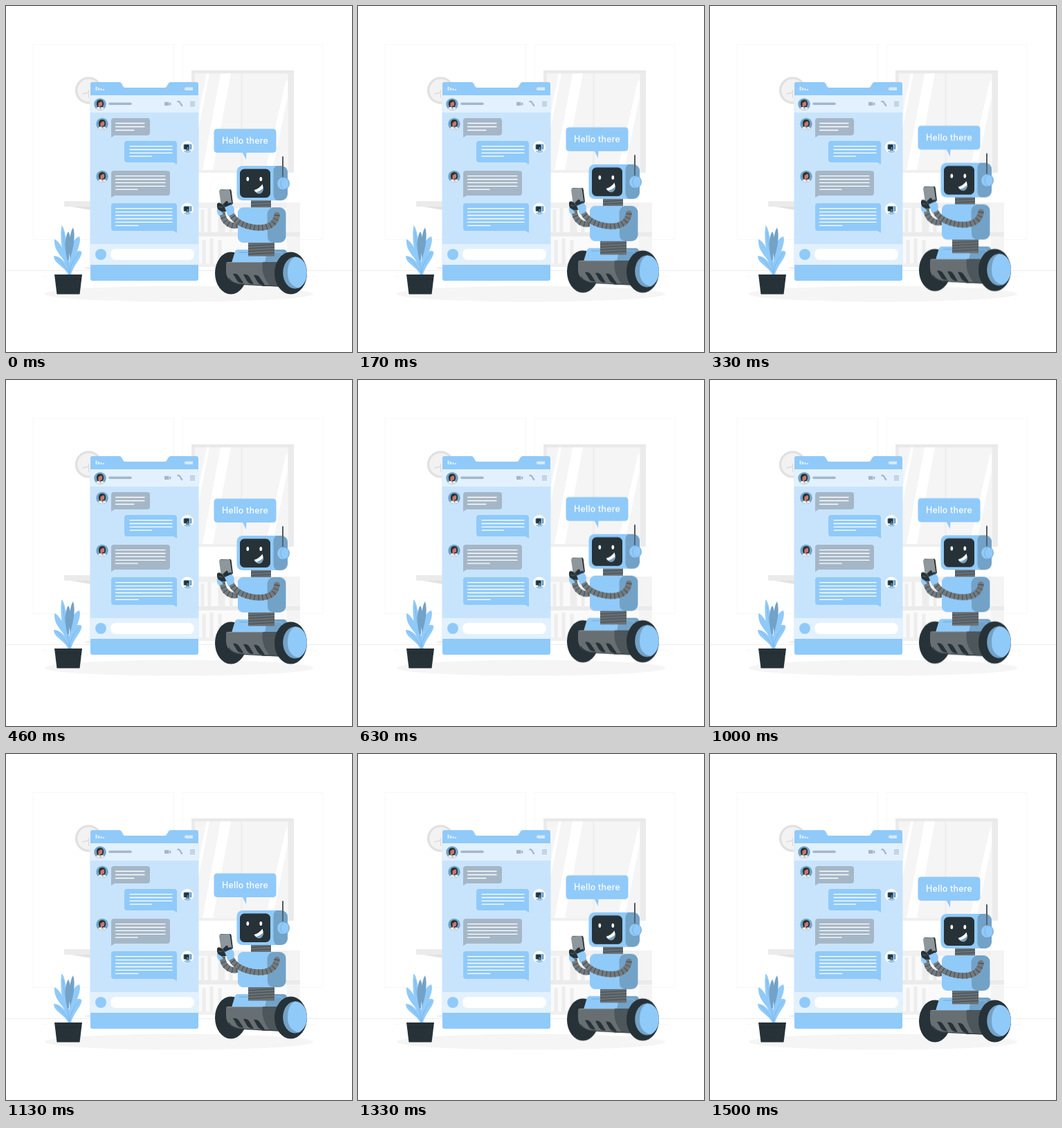
These frames come from a looping animation (500 px wide and 500 px high, 1.54 s). An HTML page:

```html
<!DOCTYPE html>
<html lang="en">
<head>
<meta charset="utf-8">
<title>Chat bot</title>
<style>
  html, body { margin: 0; width: 100%; height: 100%; overflow: hidden; background: #fff; }
  svg { display: block; width: 100%; height: 100%; }
  .blue { fill: #90caf9; }
  .shade { fill: #73a2c7; }
  .dark { fill: #263238; }
  .metal { fill: #676f73; }
  .grey { fill: #a5b7c7; }
  .white { fill: #fff; }
  .line { fill: none; stroke: #fff; stroke-width: 1.3; stroke-linecap: round; }
  .arm { fill: none; stroke: #737a7e; stroke-width: 8.5; }
  .rib { fill: none; stroke: #3c464b; stroke-width: 8.5; stroke-dasharray: .9 5; }
  .ring { fill: none; stroke: #434c51; stroke-width: 1; }
  .hello { font: 500 12.4px Inter, "Open Sans", sans-serif; letter-spacing: .25px; fill: #fff; text-anchor: middle; }
  /* 1.5 s triangle wave in 36 steps, then a short rest */
  .float { animation: float 1540ms -4ms infinite; }
  @keyframes float {
    0% { transform: translateY(0); animation-timing-function: steps(18); }
    48.7013% { transform: translateY(-10px); animation-timing-function: steps(18); }
    97.4026%, 100% { transform: translateY(0); }
  }
</style>
</head>
<body>
<svg viewBox="0 0 500 500">
  <defs>
    <g id="user">
      <circle r="8.7" class="shade"/>
      <path class="dark" d="M-4.6 2C-6-3-4-6.500 0-6.500S5.600-3 5 1L3.500 4H-4Z"/>
      <path fill="#c9776b" d="M-2.500-3Q1-5 3.300-2.500L3 1.500Q1.500 3.500 0 2.500V5H-2.500Z"/>
      <path class="dark" d="M-3.500-1.500Q0-2 1.500-5Q-3-6-4-2Z"/>
      <path fill="#e9eef2" d="M-6 6.300Q-4 3.600-2 4L.5 6L2 4Q5 4 6 6.300Q0 10.800-6 6.300Z"/>
      <path fill="#e08a7c" d="M-2 4L.5 6.500L2 4L1 8Z"/>
    </g>
    <g id="bot">
      <circle r="9" class="white"/>
      <rect x="-5.500" y="-4.500" width="12" height="8" rx="1.500" class="shade"/>
      <rect x="-5.500" y="-4.500" width="9.500" height="8" rx="1.500" class="blue"/>
      <rect x="-4.800" y="-3.800" width="7.300" height="6.700" rx="1" class="dark"/>
      <path d="M-1 1.500L1.200.2L.8 1.700Z" class="white"/>
      <path d="M-2 3.500H3V5H-2Z" class="metal"/>
      <path d="M-5 6.500Q-5 5-3 5H4Q6 5 5.500 6.800Q0 10.500-5 6.500Z" class="blue"/>
    </g>
  </defs>

  <!-- room -->
  <path d="M39 55.500H242.500V337.500H39ZM255 55.500H458V337.500H255Z" fill="none" stroke="#f7f7f7"/>
  <path d="M0 382.500H500" stroke="#ededed"/>
  <path d="M416 390.500H449M401 393.500H410M52 390.500H60M447 398.500H450" stroke="#f2f2f2" stroke-width=".7"/>
  <circle cx="119.500" cy="122" r="18" fill="#f2f2f2" stroke="#e0e0e0" stroke-width="3.200"/>
  <path d="M119.500 121V133M120 125L110 127" fill="none" stroke="#dcdcdc" stroke-width="1.300"/>
  <path d="M84 282H123V290H86Q84 290 84 288Z" fill="#ebebeb"/>
  <path d="M94 290H123V295Z" fill="#e2e2e2"/>
  <path d="M112 379L123 376V381Z" fill="#ededed"/>

  <path d="M268 93H416V241H268Z" fill="#f0f0f0"/>
  <path d="M268 93H416V97.500H268Z" fill="#e9e9e9"/>
  <path d="M407.500 97H416V241H407.500ZM268 97H273V241H268Z" fill="#ebebeb"/>
  <path d="M273 97.500H407.500V237H273Z" fill="#f5f5f5"/>
  <path d="M310 97.500H325L299 237H284ZM290 97.500H294L273 205V183ZM404 110L407 105V131L385 237H375Z" fill="#fff"/>
  <path d="M339 97.500H342V237H339Z" fill="#efefef"/>

  <path d="M278 284H425V377H278Z" fill="#f0f0f0"/>
  <path d="M278 292H406V327H278ZM278 333H406V372H278Z" fill="#fafafa"/>
  <path d="M284 294V327M294 292V327M309 292V327M314 296V327M325 294V327M286 338V372M297 336V372M309 338V372" stroke="#ededed" stroke-width="5"/>
  <path d="M406 284H425V377H406Z" fill="#f4f4f4"/>
  <path d="M278 327H425V333H278Z" fill="#ebebeb"/>
  <ellipse cx="250" cy="416" rx="194" ry="11.500" fill="#f5f5f5"/>

  <!-- plant -->
  <path class="blue" d="M90 389C82 366 77 335 80.500 317C88 326 87 350 91 370C97 357 103 351 109 355C111 363 97 374 94 389Z"/>
  <path class="blue" d="M90 388C83 375 69 372 69 361C78 361 86 370 90 378C82 361 69 356 70 337C79 341 87 359 90 372ZM92 372C91 353 96 336 106 333C110 342 100 360 94 374Z"/>
  <path class="shade" d="M89 367C84 350 85 333 90 326C95 332 92 351 91 368ZM92 360C91 346 92 327 97 320C101 332 97 351 93 364Z"/>
  <path d="M92 388C89 366 84 345 82 326M92 385C93 374 99 364 106 357M90 384C85 375 78 368 72 363" fill="none" stroke="#79acd6" stroke-width=".7"/>
  <path class="dark" d="M70 388H110L106.500 416.500H73.500Z"/>
  <path d="M71 395H109" stroke="#1f292e" stroke-width=".7"/>

  <!-- chat window -->
  <path class="blue" d="M122 129V113Q122 110 125 110H164Q166 110 167 112L169.500 116.500Q170.500 118 172 118H229Q231 118 232 116.500L235 111.500Q236 110 238 110H275Q278 110 278 113V394Q278 397 275 397H125Q122 397 122 394Z"/>
  <path fill="#c8e4fc" d="M121.500 129H278.500V374H121.500Z"/>
  <path fill="#e2f1fd" d="M121.500 129H278.500V154H121.500ZM121.500 344H278.500V374H121.500Z"/>
  <path d="M130.500 116.500V122M134 118V122M137.500 119V122M141 120V122" stroke="#e2f1fd" stroke-width="2"/>
  <path fill="#d5eafc" d="M260 117.500H270V122H260L258 121V118.500Z"/>
  <use href="#user" x="136" y="142"/>
  <path d="M150 141.300H180" stroke="#a5b7c7" stroke-width="3.600" stroke-linecap="round"/>
  <path class="grey" d="M229 138.800H235.500V144H229ZM236 140.500L238.300 139V144L236 142.500Z"/>
  <path d="M247.500 138.500Q250 136.500 252 140.500Q253 143 255 144.500" fill="none" stroke="#a5b7c7" stroke-width="2.200"/>
  <path d="M266 138.500H273M266 140.500H273M266 142.500H273M266 144.600H273" stroke="#a5b7c7"/>

  <path class="grey" d="M156 162H204Q208 162 208 166V183Q208 187 204 187H157L152 190V166Q152 162 156 162Z"/>
  <path class="line" d="M158.500 169.500H200M158.500 174.500H200M158.500 179.500H185"/>
  <path class="blue" d="M175 195H243Q247 195 247 199V229L242 226H175Q171 226 171 222V199Q171 195 175 195Z"/>
  <path class="line" d="M179 202.700H240M179 207.500H240M179 212.400H240M179 217.200H210.500"/>
  <path class="grey" d="M156 238H233Q237 238 237 242V270Q237 274 233 274H157L152 277V242Q152 238 156 238Z"/>
  <path class="line" d="M158.500 245.700H230M158.500 250.500H230M158.500 255.400H230M158.500 260.300H230M158.500 265.200H190"/>
  <path class="blue" d="M156 285H243Q247 285 247 289V328L242 325H156Q152 325 152 321V289Q152 285 156 285Z"/>
  <path class="line" d="M158.500 292.700H240M158.500 297.600H240M158.500 302.500H240M158.500 307.500H240M158.500 312.400H240M158.500 317.400H191"/>
  <use href="#user" x="139" y="170.500"/>
  <use href="#user" x="139" y="246.500"/>
  <use href="#bot" x="262" y="204"/>
  <use href="#bot" x="262" y="293.500"/>
  <circle cx="137" cy="359" r="8" class="blue"/>
  <rect x="151" y="351" width="121" height="16" rx="7.500" class="white"/>

  <g class="float">
    <!-- speech -->
    <path class="blue" d="M305.500 177.500H385.500Q390.500 177.500 390.500 182.500V207Q390.500 212 385.500 212H347.500L346.800 222L342 212H305.500Q300.500 212 300.500 207V182.500Q300.500 177.500 305.500 177.500Z"/>
    <text class="hello" x="345.600" y="198.500">Hello there</text>

    <!-- base -->
    <ellipse cx="325" cy="386" rx="23" ry="30.500" class="dark"/>
    <path class="shade" d="M334 352H401Q405 352 406 356L410 372H327Z"/>
    <path class="blue" d="M335 352H378L374 371H326L331 354.500Q332 352 335 352Z"/>
    <path d="M337 356H350M388 356H398L402 370" fill="none" stroke="#7fb4de" stroke-width="1.500"/>
    <path class="metal" d="M350 342H388V361.500H350Z"/>
    <path class="ring" d="M350 346.500L388 344.500M350 350.500L388 348.500M350 354.500L388 352.500M350 358.500L388 356.500"/>
    <path fill="#4c565b" d="M370 370H412V405H370Z"/>
    <path class="metal" d="M320 370H371Q368 388 381 404L335 401Q318 398 318 383V372Q318 370 320 370Z"/>
    <path fill="#8b9194" d="M320 370H371V371H320Z"/>
    <path class="dark" d="M328 387Q334 386 337 391L343 400Q337 401 334 397ZM343 388Q349 387 352 392L358 402Q351 402 348 397ZM358 389Q364 388 367 393L374 403Q366 404 363 398Z"/>
    <path d="M322 393Q326 400 337 402L395 405" fill="none" stroke="#394449" stroke-width="1.500"/>
    <ellipse cx="411.500" cy="386" rx="23.500" ry="30.500" class="dark"/>
    <ellipse cx="417.500" cy="385.500" rx="17.300" ry="23" class="shade"/>
    <path class="blue" d="M418 362.500C428 363 434.800 373 434.800 385.500C434.800 396 430 404 423 407.500C412 405 407 397 407 386C407 375 410 366 418 362.500Z"/>

    <!-- far arm, body -->
    <path class="arm" d="M339 315C327 321 313 315 312 295"/>
    <path class="rib" d="M339 315C327 321 313 315 312 295"/>
    <path class="metal" d="M354 280H383V293H354Z"/>
    <path class="ring" d="M354 284.500L383 283M354 288.500L383 287"/>
    <rect x="335" y="291" width="69.500" height="51" rx="9" class="shade"/>
    <path class="blue" d="M344 291H386Q377 293 377.500 303L378 333Q378 341 386 342H344Q335 342 335 333V300Q335 291 344 291Z"/>
    <path class="arm" stroke-linecap="round" d="M391.500 302C389 322 366 323 349 318C336 314 328 307 325 299"/>
    <path class="rib" d="M391.500 302C389 322 366 323 349 318C336 314 328 307 325 299"/>

    <!-- handset and hands -->
    <path class="dark" d="M309 267Q309 265 311 265H323.500Q325.500 265 325.700 267L328 286L314 289Z"/>
    <path fill="#8e979b" d="M308 268Q308 265.500 310.500 265.400L321.500 265Q323.400 265 323.700 267L326.500 286L311 289Z"/>
    <path class="dark" d="M305 286Q307 283 310 285L313 287L318 282Q321 281 321 285L325 284Q328 286 325 290L319 297L311 297Q304 296 305 286Z"/>
    <path d="M307 290L313 291M312 286L316 291" stroke="#66737a" stroke-width=".8"/>
    <path class="blue" d="M316 291L325 287Q329 288 330 294L329 300L321 304Z"/>
    <path class="blue" d="M305 293L311 297L314 301L308 303Q304 300 305 293Z"/>

    <!-- head -->
    <path d="M400 217.500V252" stroke="#3b464b" stroke-width="1.300"/>
    <rect x="340" y="231" width="67" height="50" rx="9" class="shade"/>
    <path class="blue" d="M343 231H391Q386 233 386.500 241V272Q387 280 392 281H343Q333.500 281 333.500 272V240Q333.500 231 343 231Z"/>
    <rect x="338" y="235.500" width="44" height="41.500" rx="6.500" class="dark"/>
    <ellipse cx="349.300" cy="250" rx="1.900" ry="3.100" class="white"/>
    <ellipse cx="368.300" cy="250" rx="1.900" ry="3.100" class="white"/>
    <path class="white" d="M358.500 266Q366 264 370.500 257.500Q374 267 367.500 271Q362 272 358.500 266Z"/>
    <path class="shade" d="M361 269Q367 268 371.700 263Q371.500 269 367.500 271Q364 271.500 361 269Z"/>
    <path d="M400 217.500V249" stroke="#3b464b" stroke-width="1.300"/>
    <ellipse cx="400.500" cy="256.500" rx="9" ry="9.300" class="blue" stroke="#6594bb" stroke-width=".7"/>
    <path class="blue" d="M402 248Q409 249 409 256.500T402 265Q397 262 397 256.500T402 248Z" stroke="#79acd6" stroke-width=".8"/>
  </g>
</svg>
</body>
</html>
```
